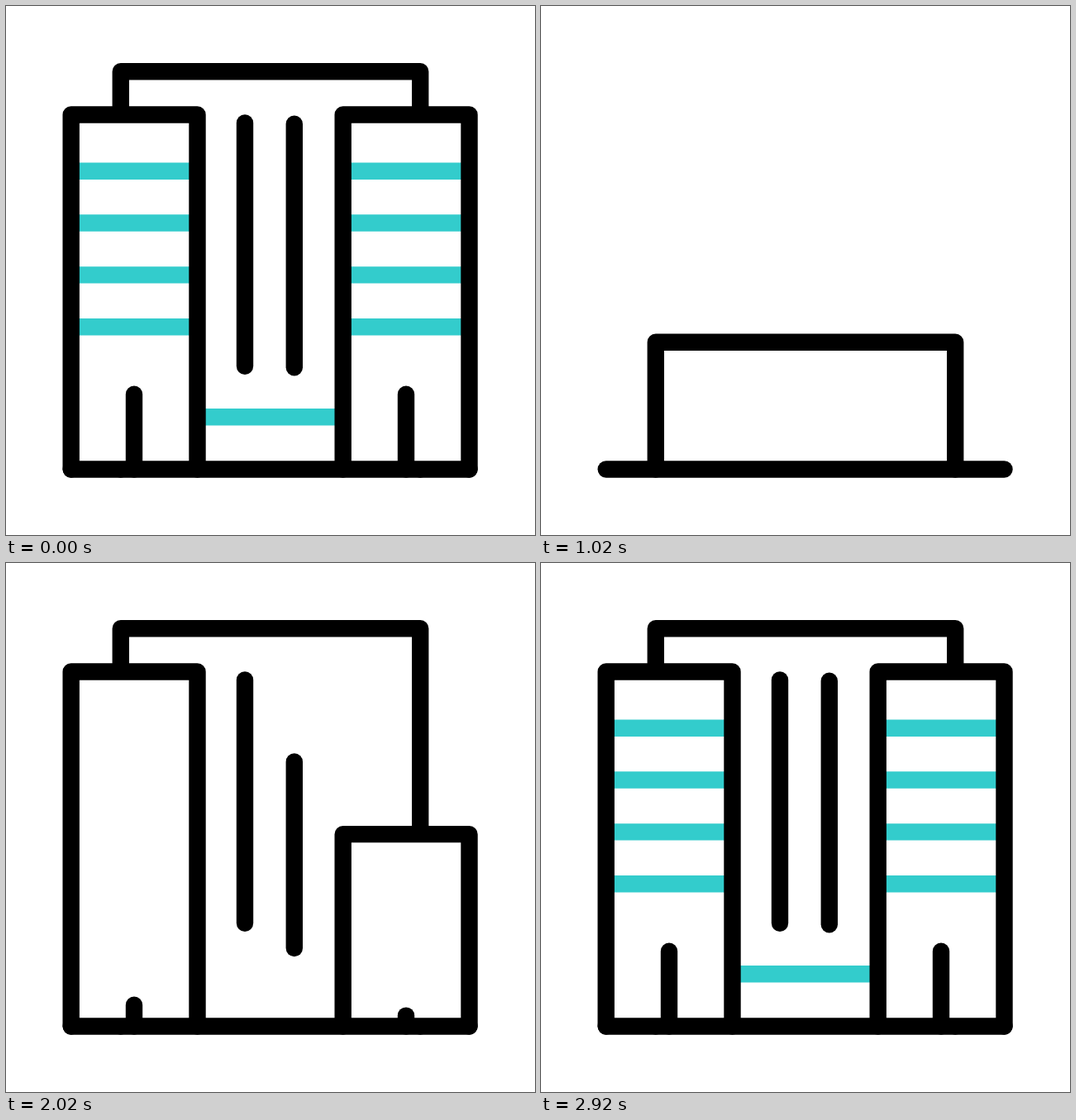
Recreate the animation shown at these times as an HTML page with a canvas. Size 640 by 640 pixels, loop 3600 ms.

```html
<!DOCTYPE html>
<html lang="en">
<head>
<meta charset="utf-8">
<title>Building</title>
<style>
  html, body { margin: 0; width: 100%; height: 100%; overflow: hidden; background: #fff; }
  canvas { display: block; width: 100vw; height: 100vh; }
</style>
</head>
<body>
<canvas id="stage" width="640" height="640"></canvas>
<script>
const ctx = document.getElementById('stage').getContext('2d');
const LOOP = 3600, OUT = 660, RISE = 1000;
const BASE = 560.5, LINE = 20.4;
const INK = '#000', TEAL = '#33cccc';
const STRIPES = [199.8, 262.5, 325.4, 388.2];

// Start and length of each part's rise, in ms
const TIMES = {
  block: [1000, 374],
  towerL: [1352, 509],
  barL: [1471, 500],
  barR: [1715, 500],
  towerR: [1790, 500],
  doorL: [1865, 500],
  doorR: [1913, 500],
  stripesR: [2141, 600],
  stripesL: [2252, 600],
  step: [2309, 600]
};
const STAGGER = 24.5;

// Cubic bezier (0.333, 0, 0.5, 1)
function ease(x) {
  if (x <= 0) return 0;
  if (x >= 1) return 1;
  let lo = 0, hi = 1;
  for (let i = 0; i < 24; i++) {
    const u = (lo + hi) / 2, v = 1 - u;
    if (u * v * v + 1.5 * u * u * v + u * u * u < x) lo = u; else hi = u;
  }
  return lo * lo * (3 - 2 * lo);
}

// Share of full height: falls together, rises part by part
function grow(t, part, delay = 0) {
  if (t < RISE) return 1 - ease(t / OUT);
  const [start, length] = TIMES[part];
  return ease((t - start - delay) / length);
}

const lift = (y, s) => BASE + (y - BASE) * s;

function stroke(points, color = INK, cap = 'round') {
  ctx.beginPath();
  points.forEach(([x, y]) => ctx.lineTo(x, y));
  ctx.strokeStyle = color;
  ctx.lineCap = cap;
  ctx.stroke();
}

function bar(x, top, bottom, s) {
  if (s > 0) stroke([[x, lift(top, s)], [x, lift(bottom, s)]]);
}

function stripe(x1, x2, y, s) {
  if (s > 0) stroke([[x1, lift(y, s)], [x2, lift(y, s)]], TEAL, 'butt');
}

function frame(x1, x2, top) {
  stroke([[x1, BASE], [x1, top], [x2, top], [x2, BASE]]);
}

function tower(t, side, x1, x2, doorX) {
  const s = grow(t, 'tower' + side);
  if (s <= 0) return;
  const top = lift(131.5, s);
  ctx.fillStyle = '#fff';
  ctx.fillRect(x1, top, x2 - x1, BASE - top);
  STRIPES.forEach((y, i) => stripe(x1, x2, y, grow(t, 'stripes' + side, i * STAGGER)));
  bar(doorX, 469.8, BASE, grow(t, 'door' + side));
  frame(x1, x2, top);
}

function draw(t) {
  ctx.fillStyle = '#fff';
  ctx.fillRect(0, 0, 640, 640);
  ctx.lineWidth = LINE;
  ctx.lineJoin = 'round';

  frame(138.8, 501.2, 410 + (79.3 - 410) * grow(t, 'block'));
  stripe(231.5, 407.7, 497.3, grow(t, 'step'));
  bar(289, 141.5, 435.8, grow(t, 'barL'));
  bar(348.8, 142.8, 437.2, grow(t, 'barR'));
  tower(t, 'L', 78.7, 231.5, 155);
  tower(t, 'R', 407.7, 560.5, 484);
  stroke([[78.7, BASE], [560.5, BASE]]);
}

const begin = performance.now();
function tick() {
  draw((performance.now() - begin) % LOOP);
  requestAnimationFrame(tick);
}
tick();
</script>
</body>
</html>
```
